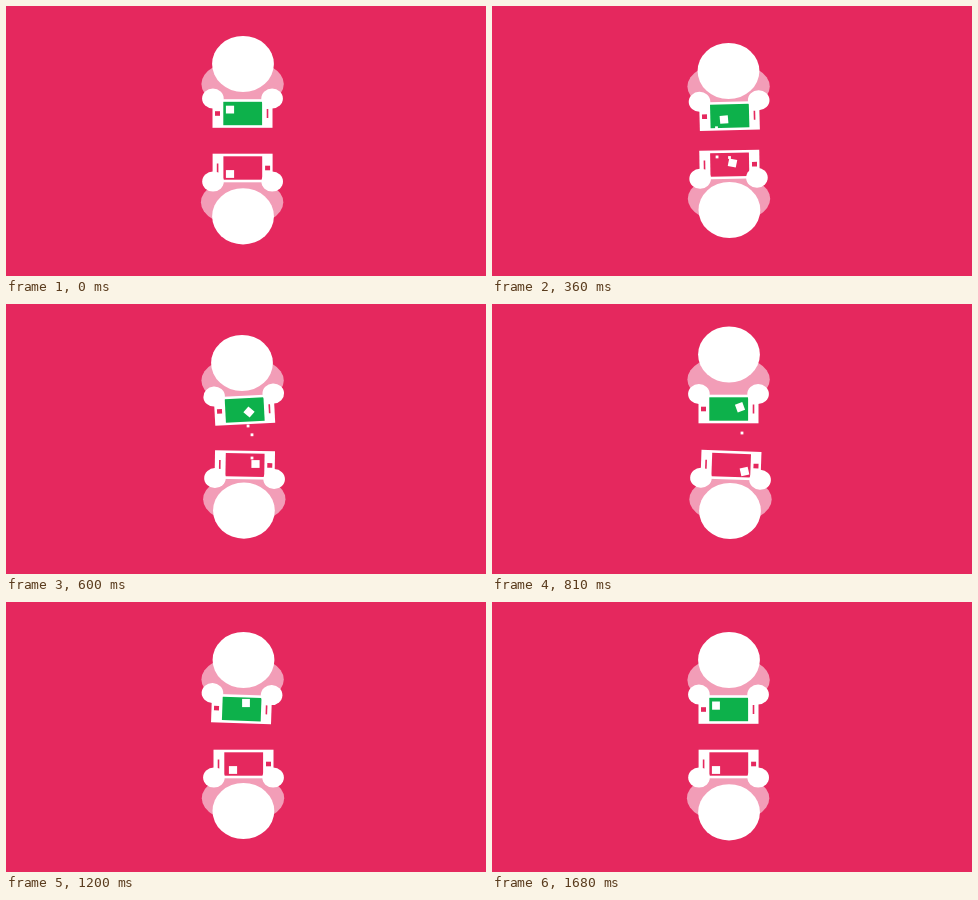
Recreate the animation shown at these times as an HTML page. Size 480x270 px, loop 1.71 s.

```html
<!DOCTYPE html>
<html lang="en">
<head>
<meta charset="utf-8">
<title>Phone duel</title>
<style>
  html, body { margin: 0; width: 100%; height: 100%; overflow: hidden; background: #e5285e; }
  svg { display: block; width: 100vw; height: 100vh; }
</style>
</head>
<body>
<svg id="stage" viewBox="0 0 480 270"></svg>
<script>
const LOOP = 1710, STEP = 30;
const PINK = '#e5285e', GREEN = '#0db14b', WHITE = '#fff';
const stage = document.getElementById('stage');

function add(parent, tag, attrs) {
  const node = document.createElementNS('http://www.w3.org/2000/svg', tag);
  for (const name in attrs) node.setAttribute(name, attrs[name]);
  parent.appendChild(node);
  return node;
}
const ellipse = (parent, rx, ry, fill, cx = 0, cy = 0) => add(parent, 'ellipse', { cx, cy, rx, ry, fill });
const box = (parent, w, h, fill, cx = 0, cy = 0) =>
  add(parent, 'rect', { x: cx - w / 2, y: cy - h / 2, width: w, height: h, fill });
const place = (node, x, y, angle = 0) =>
  node.setAttribute('transform', `translate(${x} ${y}) rotate(${angle})`);

// Smooth interpolation that never overshoots its keys.
function track(times, values) {
  const last = times.length - 1;
  const slope = i => (values[i + 1] - values[i]) / (times[i + 1] - times[i]);
  const tangent = i => {
    if (i === 0 || i === last) return 0;
    const a = slope(i - 1), b = slope(i);
    return a * b <= 0 ? 0 : 2 * a * b / (a + b);
  };
  return t => {
    if (t >= times[last]) return values[last];
    let i = 0;
    while (t >= times[i + 1]) i++;
    const h = times[i + 1] - times[i], u = (t - times[i]) / h, v = 1 - u;
    return v * v * (1 + 2 * u) * values[i] + u * u * (3 - 2 * u) * values[i + 1]
      + h * u * v * (v * tangent(i) - u * tangent(i + 1));
  };
}

const bodyTimes = [0, 210, 360, 600, 810, 900, 1080, 1200, 1620];
const shipTimes = [...bodyTimes.slice(0, -1), 1680];

function makePlayer({ side, screen, headX, shoulders, tapAt, motion }) {
  const torso = ellipse(stage, 41.2, 24, '#f29db7');
  const phone = add(stage, 'g', {});
  box(phone, 60, 28.6, WHITE);
  box(phone, 38.8, 23.4, screen, 0.2);
  box(phone, 5, 4.6, PINK, -25 * side, 0);
  box(phone, 1.6, 9, PINK, 25 * side, 0);
  const hands = [-1, 1].map(dir => ellipse(phone, 10.8, 10, WHITE, dir * 29.6, side > 0 ? -15 : 13.6));
  const head = ellipse(stage, 30.9, 28.1, WHITE);
  const ship = add(stage, 'g', {});
  box(ship, 8.2, 7.8, WHITE);

  const tracks = Object.fromEntries(Object.entries(motion).map(([name, values]) =>
    [name, track(name.startsWith('ship') ? shipTimes : bodyTimes, values)]));

  return t => {
    const at = name => tracks[name](t);
    const x = at('phoneX'), y = at('phoneY');
    place(phone, x, y, at('tilt'));
    place(torso, ...shoulders(x, y));
    place(head, headX(x), at('headY'));
    place(ship, at('shipX'), at('shipY'), at('shipTurn'));
    const tap = Math.max(0, 1 - Math.abs(t - tapAt) / 90);
    place(hands[1], -2.4 * tap, side > 0 ? 1.6 * tap : 0);
  };
}

const players = [
  makePlayer({
    side: 1, screen: GREEN, tapAt: 210,
    headX: x => 237 - (x - 236.5) / 2,
    shoulders: (x, y) => [236.6, y - 29.5],
    motion: {
      headY: [58, 67, 65, 59, 50.5, 48.5, 58, 58, 58],
      phoneX: [236.5, 238, 237.5, 238.5, 236.5, 236.4, 235.8, 235.5, 236.5],
      phoneY: [107.5, 111, 110, 106, 105, 105.2, 106.8, 107, 107.5],
      tilt: [0, -3, -1.5, -3, 0, 0.5, 1.6, 2, 0],
      shipX: [224, 225.5, 232, 243, 248, 247.5, 244, 240, 224],
      shipY: [103.6, 112.5, 113.6, 108, 103.2, 102.5, 101.4, 101, 103.6],
      shipTurn: [0, -3, -5, 40, 70, 80, 90, 90, 90]
    }
  }),
  makePlayer({
    side: -1, screen: PINK, tapAt: 360,
    headX: x => 237 + (x - 236.5) * 0.4,
    shoulders: (x, y) => [x - 0.5, y + 34.2],
    motion: {
      headY: [210.3, 203, 204, 206.6, 207, 207.5, 208.5, 209, 210.3],
      phoneX: [236.6, 238.6, 237.5, 238.8, 239, 238.7, 237.9, 237.5, 236.6],
      phoneY: [162, 158.5, 158.6, 161, 161.2, 161.4, 161.8, 162, 162],
      tilt: [0, 2, -1, 1, 2, 1.6, 0.6, 0, 0],
      shipX: [224, 230.5, 240.5, 249.5, 252.5, 249, 234, 227, 224],
      shipY: [168, 158.5, 157, 160, 167.5, 168, 168, 168, 168],
      shipTurn: [0, 9, 11, 0, -13, -8, 0, 0, 0]
    }
  })
];

// Positions at time "t", velocities in pixels per millisecond.
const bullets = [
  { from: 60, to: 420, t: 210, x: 223, y: 140.5, vx: 0.01, vy: -0.125 },
  { from: 60, to: 430, t: 210, x: 224, y: 129.5, vx: 0.007, vy: 0.143 },
  { from: 330, to: 670, t: 360, x: 237.5, y: 151.5, vx: 0.019, vy: -0.123 },
  { from: 470, to: 800, t: 600, x: 246, y: 130.8, vx: 0.019, vy: 0.14 },
  { from: 570, to: 960, t: 600, x: 246, y: 154, vx: 0.019, vy: -0.119 }
].map(shot => ({ ...shot, node: box(stage, 2.8, 2.8, WHITE) }));

function draw(t) {
  players.forEach(pose => pose(t));
  for (const b of bullets) {
    b.node.style.display = t >= b.from && t < b.to ? '' : 'none';
    place(b.node, b.x + b.vx * (t - b.t), b.y + b.vy * (t - b.t));
  }
}

const start = performance.now();
function tick() {
  const t = (performance.now() - start) % LOOP;
  draw(Math.floor(t / STEP) * STEP);
  requestAnimationFrame(tick);
}
tick();
</script>
</body>
</html>
```
